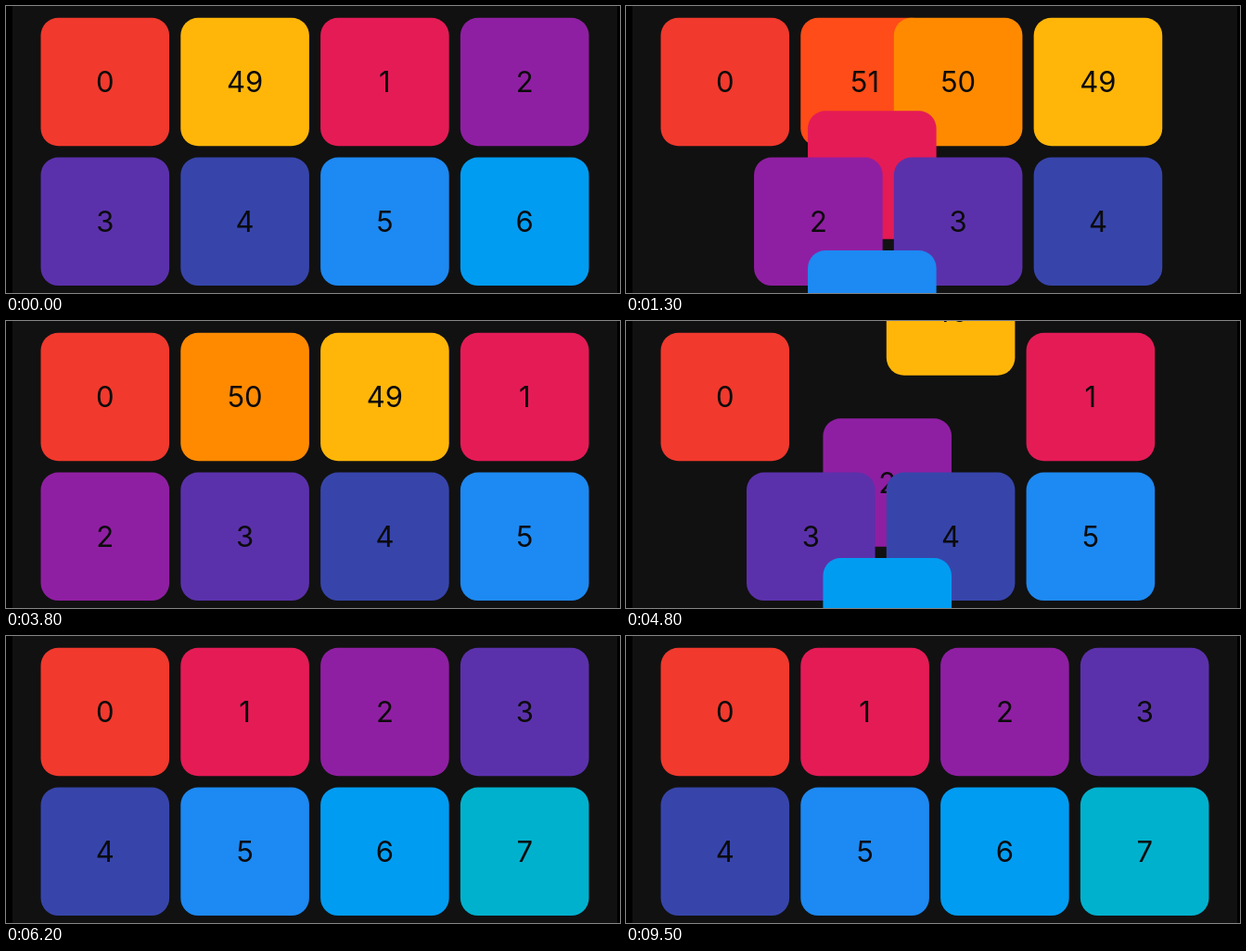
These frames come from a looping animation (662 px wide and 310 px high, 9600 ms). An HTML page with a canvas:

```html
<!DOCTYPE html>
<html lang="en">
<head>
<meta charset="utf-8">
<title>Animated grid</title>
<style>
  html, body { margin: 0; width: 100%; height: 100%; overflow: hidden; background: #000; }
  canvas { display: block; }
</style>
</head>
<body>
<canvas id="stage" width="662" height="310"></canvas>
<script>
const ctx = document.getElementById('stage').getContext('2d');
const LOOP = 9600, STEP = 100, MOVE = 300, FADE = 300, FADE_LEAD = 400;
const COLS = 4, PITCH = 150.8, SIZE = 138.6, RADIUS = 19, LEFT = 37.5, TOP = 12.7;

const COLORS = {
  0: '#f1392d', 1: '#e51b56', 2: '#8f1fa2', 3: '#5b31ab', 4: '#3745ab',
  5: '#1d89f2', 6: '#009cf2', 7: '#00b1ce', 8: '#008878',
  49: '#ffb608', 50: '#ff8a00', 51: '#ff4c18'
};

// Each change starts shifting the neighbours at the given time.
const CHANGES = [
  { at: 200, add: 50 },
  { at: 1100, add: 51 },
  { at: 3400, drop: 51 },
  { at: 4684, drop: 50 },
  { at: 5870, drop: 49 }
];

const clamp = v => Math.max(0, Math.min(1, v));
const mix = (a, b, p) => a + (b - a) * p;
const slotPos = i => ({
  x: LEFT + (i % COLS) * PITCH,
  y: TOP + Math.floor(i / COLS) * PITCH
});

function drawTile(id, x, y, alpha = 1) {
  if (alpha <= 0 || y > 310) return;
  ctx.globalAlpha = alpha;
  ctx.fillStyle = COLORS[id];
  ctx.beginPath();
  ctx.roundRect(x, y, SIZE, SIZE, RADIUS);
  ctx.fill();
  ctx.fillStyle = '#0b0b0b';
  ctx.fillText(id, x + SIZE / 2, y + SIZE / 2 + 11.3);
  ctx.globalAlpha = 1;
}

function stateAt(t) {
  let list = [0, 49, 1, 2, 3, 4, 5, 6, 7, 8];
  let last = null;
  for (const c of CHANGES) {
    if (t < c.at) break;
    list = c.add ? [0, c.add, ...list.slice(1)] : list.filter(id => id !== c.drop);
    last = c;
  }
  const next = CHANGES.find(c => c.at > t);
  return { list, last, next };
}

function tilePos(slot, change, p) {
  const to = slotPos(slot);
  if (!change || p >= 1 || slot === 0 || (change.add && slot === 1)) return to;
  const from = slotPos(slot + (change.add ? -1 : 1));
  // The tile that takes over the freed slot drops in from the row above.
  if (change.drop && slot === 1) from.y -= PITCH;
  // Tiles wrapping to the next row trail a little sideways.
  const px = change.add && from.y !== to.y ? p ** 1.064 : p;
  return { x: mix(from.x, to.x, px), y: mix(from.y, to.y, p) };
}

function render(t) {
  const { list, last, next } = stateAt(t);
  const p = last ? clamp((t - last.at) / MOVE) : 1;

  ctx.fillStyle = '#000';
  ctx.fillRect(0, 0, 662, 310);
  ctx.fillStyle = '#111';
  ctx.fillRect(7, 0, 652, 310);

  list.forEach((id, slot) => {
    const { x, y } = tilePos(slot, last, p);
    let alpha = 1;
    if (last && last.add === id) alpha = clamp((t - last.at - MOVE) / FADE);
    if (next && next.drop === id) alpha = 1 - clamp((t - next.at + FADE_LEAD) / FADE);
    drawTile(id, x, y, alpha);
  });
}

ctx.font = '400 31px Inter, Roboto, sans-serif';
ctx.textAlign = 'center';

const start = performance.now();
function tick() {
  const t = (performance.now() - start) % LOOP;
  render(Math.floor(t / STEP) * STEP);
  requestAnimationFrame(tick);
}
tick();
</script>
</body>
</html>
```
